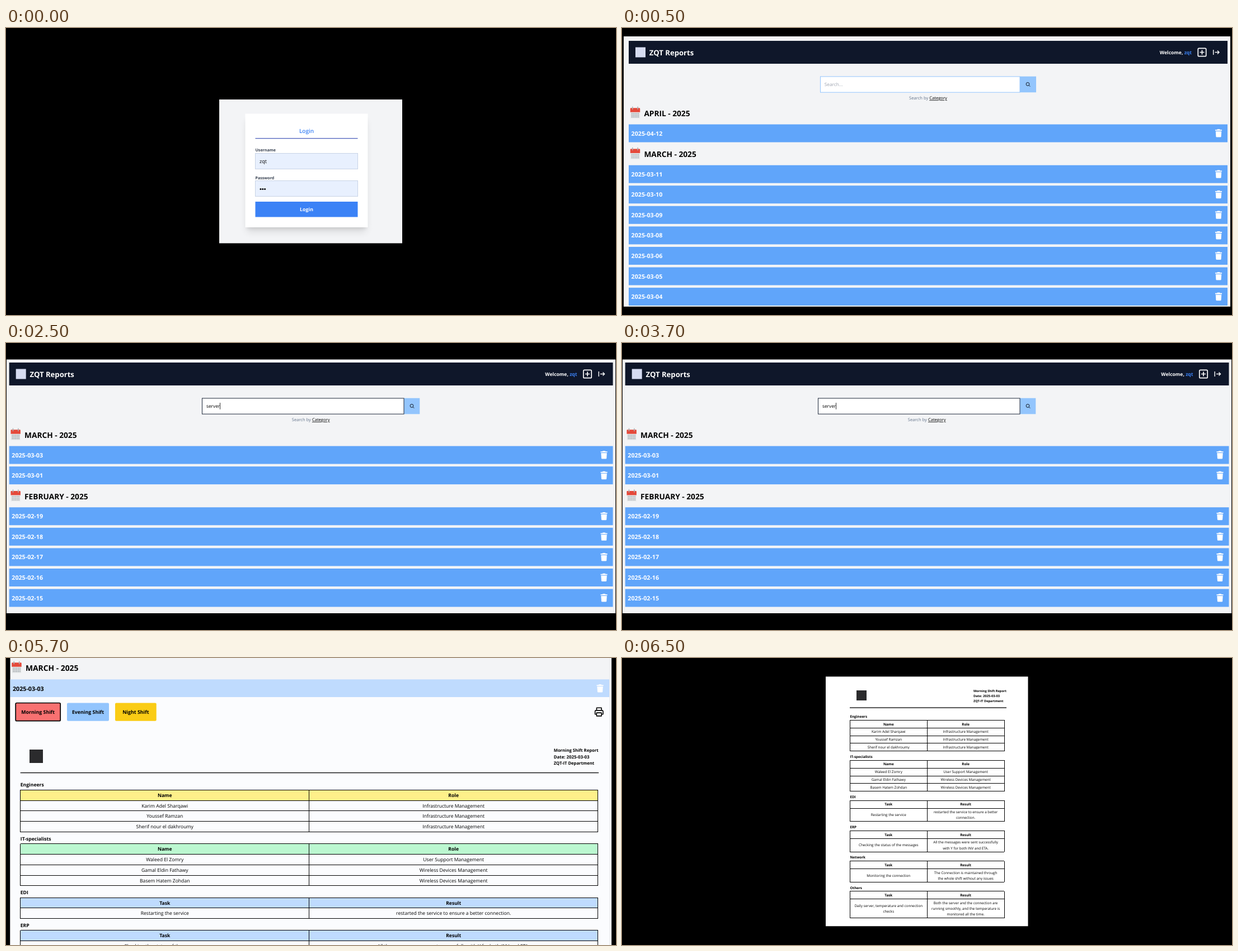
An HTML page for the animation above (8 s loop, 1090x514 px).

```html
<!DOCTYPE html>
<html lang="en">
<head>
<meta charset="utf-8">
<title>Shift reports walkthrough</title>
<style>
  html, body { margin: 0; width: 100%; height: 100%; overflow: hidden; background: #000; }
  svg { display: block; width: 1090px; height: 514px; }
  text { font-family: "Open Sans", "Noto Sans", sans-serif; text-rendering: geometricPrecision; white-space: pre; }
  .grid { stroke: #000; stroke-width: 1; shape-rendering: crispEdges; }
</style>
</head>
<body>
<svg id="stage" viewBox="0 0 1090 514">
  <defs>
    <filter id="soft" x="-20%" y="-20%" width="140%" height="140%"><feGaussianBlur stdDeviation="7"/></filter>
    <filter id="tight" x="-20%" y="-20%" width="140%" height="140%"><feGaussianBlur stdDeviation="3"/></filter>
    <g id="trash" fill="#fff">
      <path d="M-6-6.3h3.2l.7-1h4.2l.7 1h3.2v1.8h-12z"/>
      <path d="M-5.2-3.5h10.4l-.6 9.3q-.1 1.2-1.3 1.2h-6.6q-1.2 0-1.3-1.2z"/>
    </g>
    <g id="calendar">
      <rect x="-8.7" y="-8" width="17.4" height="18" rx="1.3" fill="#e9ebec"/>
      <path d="M-8.7-1.2v-6.2q0-1.3 1.3-1.3h14.8q1.3 0 1.3 1.3v6.2z" fill="#e5493a"/>
      <path d="M-4.7-10.7v4.2M4.7-10.7v4.2" stroke="#a9b0b5" stroke-width="1.5" stroke-linecap="round"/>
      <path d="M-6.7 1.2h13.6M-6.7 4.2h13.6M-6.7 7.2h13.6" stroke="#a5abb0" stroke-width="1.9" stroke-dasharray="1.9 1"/>
    </g>
    <g id="printer" fill="none" stroke="#000" stroke-width="1.6" stroke-linejoin="round">
      <path d="M-4.3-2.6v-4.6h8.6v4.6M-4.3 4.2h-2.8v-5.2q0-1.6 1.6-1.6h11q1.6 0 1.6 1.6v5.2h-2.8"/>
      <path d="M-4.3 1.6h8.6v5.8h-8.6z"/>
    </g>
  </defs>
</svg>
<script>
const rect = (x, y, x2, y2, fill, more = '') =>
  `<rect x="${x}" y="${y}" width="${x2 - x}" height="${y2 - y}" fill="${fill}" ${more}/>`;

// y is the middle of the capitals
const text = (x, y, str, size, { fill = '#000', weight = 400, anchor = 'start' } = {}) =>
  `<text x="${x}" y="${y + size * 0.357}" font-size="${size}" fill="${fill}" font-weight="${weight}" text-anchor="${anchor}">${str}</text>`;

const bold = (x, y, str, size, fill) => text(x, y, str, size, { fill, weight: 700 });
const mid = (x, y, str, size, weight, fill) => text(x, y, str, size, { fill, weight, anchor: 'middle' });
const use = (id, x, y) => `<use href="#${id}" x="${x}" y="${y}"/>`;
const line = (x, y, x2, y2) => `<line class="grid" x1="${x}" y1="${y}" x2="${x2}" y2="${y2}"/>`;

function login() {
  const field = y => rect(445.5, y, 628.5, y + 28, '#e8f0fe', 'stroke="#c8d3e6"');
  const dots = [455, 458.8, 462.6].map(x => `<circle cx="${x}" cy="288.4" r="1.5"/>`).join('');
  return rect(381, 128, 708, 385.5, '#f3f4f6')
    + rect(430.5, 167.5, 643.5, 365, '#000', 'opacity=".1" filter="url(#soft)"')
    + rect(430.5, 161.5, 643.5, 359, '#000', 'opacity=".1" filter="url(#tight)"')
    + rect(427.5, 153.5, 646.5, 357, '#fff')
    + mid(537, 184.7, 'Login', 10, 600, '#3b82f6')
    + rect(445.5, 197, 628.5, 198.4, '#5b6cc0')
    + bold(445.5, 218.8, 'Username', 7.1, '#374151')
    + field(224.5) + text(453, 238.8, 'zqt', 9)
    + bold(445.5, 268, 'Password', 7.1, '#374151')
    + field(273.5) + dots
    + rect(445.5, 311, 628.5, 338.5, '#3b82f6')
    + mid(537, 325, 'Login', 8.8, 700, '#fff');
}

function listPage({ page, left, right, dy, box, border, query, items }) {
  const y = 43.5 + dy, sy = 101 + dy, [b1, b2] = box, px = right - 45.5;
  const icons = `<g fill="none" stroke="#fff" stroke-width="1.7">
      <rect x="${px - 7.2}" y="${y - 7.2}" width="14.4" height="14.4" rx="1.8"/>
      <path d="M${px - 4} ${y}h8M${px} ${y - 4}v8"/>
      <path d="M${right - 25.3} ${y - 4.5}v9M${right - 22.5} ${y}h7.5m-3-3l3 3l-3 3" stroke-width="1.4"/></g>`;
  const lens = `<g fill="none" stroke="#111827"><circle cx="725" cy="${sy - .5}" r="2.9"/><path d="M727.1 ${sy + 1.6}l2.2 2.2"/></g>`;
  const rows = items.map((item, i) => {
    const cy = 152 + dy + 36.57 * i;
    return /^\d/.test(item)
      ? rect(left, cy - 16, right, cy + 16, '#60a5fa') + bold(left + 4.6, cy + .2, item, 10.7, '#fff') + use('trash', right - 16, cy)
      : use('calendar', left + 11.5, cy) + bold(left + 27.4, cy + 1, item, 13.7);
  }).join('');
  return rect(...page, '#f3f4f6')
    + rect(left, 23 + dy, right, 64 + dy, '#0f172a')
    + rect(left + 12, y - 9, left + 30, y + 9, '#d6dcf2')
    + bold(left + 36.8, y + 1, 'ZQT Reports', 13.1, '#fff')
    + text(right - 64, y + .3, 'Welcome, <tspan fill="#3b82f6">zqt</tspan>', 8.6, { fill: '#fff', weight: 700, anchor: 'end' })
    + icons
    + rect(711, 86.7 + dy, b2, 115.3 + dy, '#93c5fd')
    + rect(b1 + .5, 87 + dy, 711, 115.2 + dy, '#fff', `stroke="${border}"`)
    + lens
    + (query
      ? text(b1 + 8, sy + .3, query, 8.3) + rect(382, sy - 6, 382.8, sy + 5.8, '#000')
      : text(b1 + 7.7, sy, 'Search...', 8.3, { fill: '#9ca3af' }))
    + mid((b1 + b2) / 2, 125.6 + dy, 'Search by <tspan fill="#000" text-decoration="underline">Category</tspan>', 7.6, 400, '#64748b')
    + rows;
}

const dates = (month, ...days) => days.map(d => `2025-${month}-${d}`);

const manage = what => `${what} Management`;
const infra = manage('Infrastructure'), wireless = manage('Wireless Devices');
const report = [
  ['Engineers', '#fef08a', [
    ['Karim Adel Sharqawi', infra], ['Youssef Ramzan', infra], ['Sherif nour el dakhroumy', infra]]],
  ['IT-specialists', '#bbf7d0', [
    ['Waleed El Zomry', manage('User Support')], ['Gamal Eldin Fathawy', wireless], ['Basem Hatem Zohdan', wireless]]],
  ['EDI', '#bfdbfe', [['Restarting the service', 'restarted the service to ensure a better|connection.']]],
  ['ERP', '#bfdbfe', [['Checking the status of the messages', 'All the messages were sent successfully|with Y for both INV and ETA.']]],
  ['Network', '#bfdbfe', [['Monitoring the connection', 'The Connection is maintained through|the whole shift without any issues']]],
  ['Others', '#bfdbfe', [['Daily server, temperature and connection|checks',
    'Both the server and the connection are|running smoothly, and the temperature is|monitored all the time.']]],
];

function tables({ x, x2, top, rowH, lineH, gap, lead, size, tint, wrap, count }) {
  const half = (x + x2) / 2, cols = [(x + half) / 2, (half + x2) / 2];
  let y = top, out = '';
  for (const [title, color, body] of report.slice(0, count)) {
    const start = y;
    out += bold(x, y - lead, title, size);
    if (tint) out += rect(x, y, x2, y + rowH, color);
    out += line(x, y, x2, y);
    const head = body.length > 1 ? ['Name', 'Role'] : ['Task', 'Result'];
    [head, ...body].forEach((cells, r) => {
      const parts = cells.map(c => wrap ? c.split('|') : [c.replace('|', ' ')]);
      const h = rowH + lineH * (Math.max(...parts.map(p => p.length)) - 1);
      parts.forEach((p, c) => p.forEach((s, i) => {
        out += mid(cols[c], y + h / 2 + (i - (p.length - 1) / 2) * lineH, s, size, r ? 400 : 700);
      }));
      y += h;
      out += line(x, y, x2, y);
    });
    for (const cx of [x, half, x2]) out += line(cx, start, cx, y);
    y += gap;
  }
  return out;
}

const letterhead = (x, y, step, size) =>
  bold(x, y, 'Morning Shift Report', size)
  + bold(x, y + step, 'Date: 2025-03-03', size * 1.03)
  + bold(x, y + 2 * step, 'ZQT-IT Department', size);

function openReport() {
  const button = (x, x2, label, fill, more = '') =>
    rect(x, 80.5, x2, 112.7, fill, `rx="2" ${more}`) + mid((x + x2) / 2, 97, label, 8.8, 700);
  return rect(7.5, 0, 1082, 514, '#f3f4f6')
    + use('calendar', 19, 17) + bold(35, 18.5, 'MARCH - 2025', 13.85)
    + rect(7.5, 70, 1078, 514, '#fbfcfe')
    + rect(7.5, 38.3, 1078, 70, '#bfdbfe')
    + bold(12, 54.7, '2025-03-03', 10.7) + use('trash', 1061.5, 54.5)
    + button(17.2, 97.2, 'Morning Shift', '#f87171', 'stroke="#000" stroke-width="1.7"')
    + button(109, 184, 'Evening Shift', '#93c5fd')
    + button(195, 268.7, 'Night Shift', '#facc15')
    + use('printer', 1059.7, 96.5)
    + rect(42, 164, 66, 188, '#2b2b2d')
    + letterhead(978.7, 165.3, 11.5, 7.65)
    + rect(25.7, 204.9, 1059, 206.2, '#000')
    + tables({ x: 25.8, x2: 1057.6, top: 236.3, rowH: 18.8, lineH: 14, gap: 21.2, lead: 9, size: 8.6, tint: true, count: 4 });
}

function printout() {
  return rect(364, 33.3, 725.5, 480.3, '#fff')
    + rect(419, 58, 437, 76, '#2b2b2d')
    + letterhead(628, 59.3, 8.6, 5.65)
    + rect(407, 88.4, 687, 89.7, '#000')
    + tables({ x: 407.4, x2: 683, top: 111.4, rowH: 13.85, lineH: 10.05, gap: 16.5, lead: 6.5, size: 6.3, wrap: true });
}

const scenes = [
  [0, login()],
  [500, listPage({
    page: [3, 15, 1087, 499], left: 12, right: 1082, dy: 0, box: [354, 740], border: '#93c5fd',
    items: ['APRIL - 2025', ...dates('04', 12), 'MARCH - 2025', ...dates('03', 11, 10, '09', '08', '06', '05', '04')],
  })],
  [2500, listPage({
    page: [1, 29.5, 1089, 484], left: 5.7, right: 1084.5, dy: 12, box: [350, 739.3], border: '#1e293b', query: 'server',
    items: ['MARCH - 2025', ...dates('03', '03', '01'), 'FEBRUARY - 2025', ...dates('02', 19, 18, 17, 16, 15)],
  })],
  [4500, openReport()],
  [6500, printout()],
];
const LOOP = 8000;

const stage = document.getElementById('stage');
stage.insertAdjacentHTML('beforeend', scenes.map(s => `<g class="scene" visibility="hidden">${s[1]}</g>`).join(''));
const layers = stage.querySelectorAll('.scene');
let shown = -1;

function draw() {
  const t = performance.now() % LOOP;
  const now = scenes.filter(s => s[0] <= t).length - 1;
  if (now !== shown) {
    layers.forEach((g, i) => g.setAttribute('visibility', i === now ? 'visible' : 'hidden'));
    shown = now;
  }
  requestAnimationFrame(draw);
}
draw();
</script>
</body>
</html>
```
